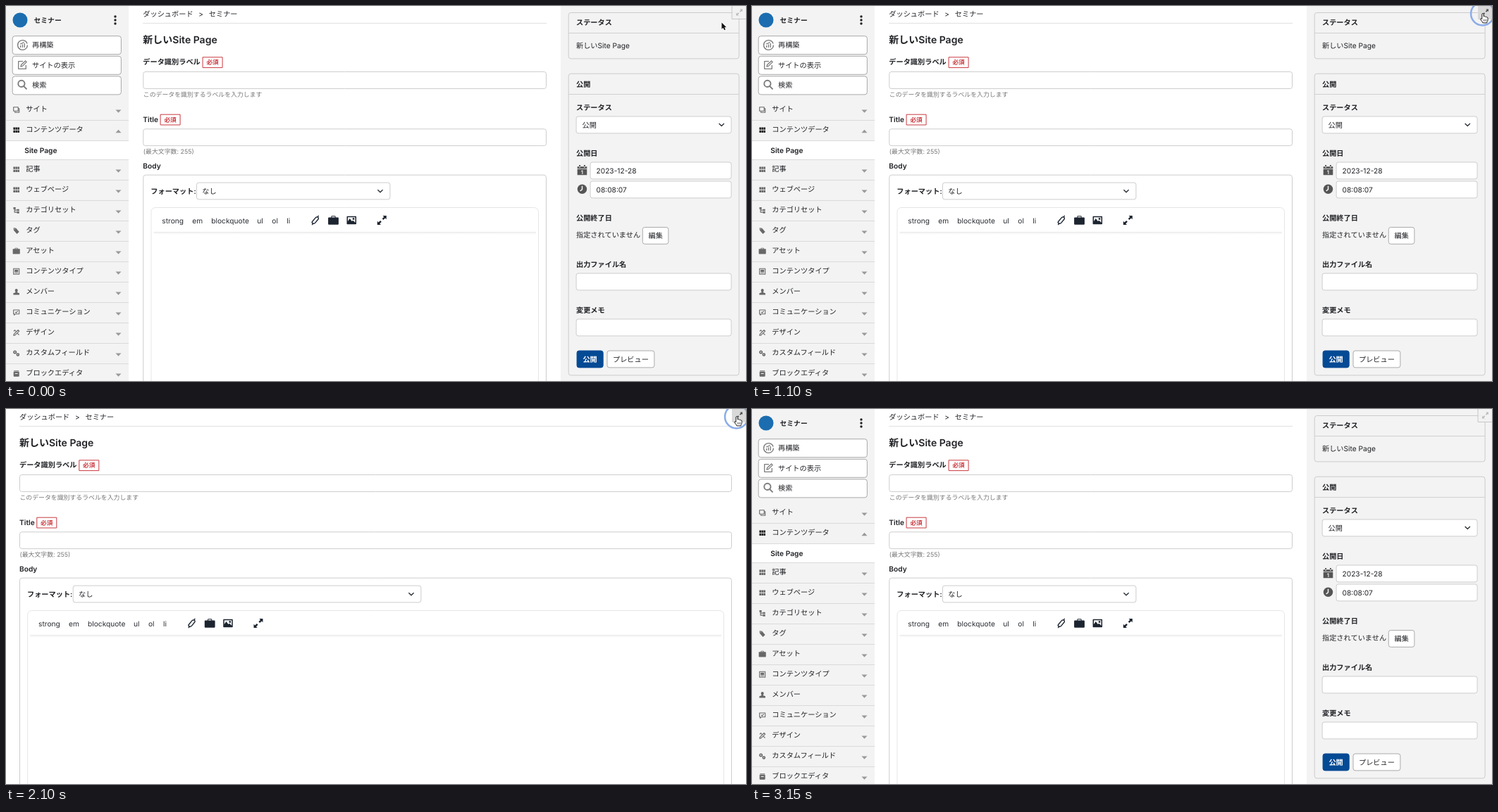
Write an HTML page with a canvas that moves like this. It is 1050 px wide and 533 px high and loops after 4550 ms.

```html
<!DOCTYPE html>
<html lang="ja">
<head>
<meta charset="utf-8">
<style>
html, body { margin: 0; width: 100%; height: 100%; overflow: hidden; background: #fff; }
canvas { display: block; width: 1050px; height: 533px; }
</style>
</head>
<body>
<canvas id="stage"></canvas>
<script>
const W = 1050, H = 533, LOOP = 4550, STEP = 50;
const FONT = 'Inter, "Noto Sans CJK JP", "Noto Sans CJK", sans-serif';
const INK = '#212226', PANEL = '#f3f3f3', GREY = '#686868', LINE = '#cdcdcd', RED = '#c93a40', NAVY = '#1c2430';
const canvas = document.getElementById('stage');
const ratio = window.devicePixelRatio || 1;
canvas.width = W * ratio;
canvas.height = H * ratio;
const ctx = canvas.getContext('2d');
ctx.textRendering = 'geometricPrecision';

// y is the visual middle of the line
function text(str, x, y, { size = 10.2, weight = 400, color = INK } = {}) {
  ctx.font = `${weight} ${size}px ${FONT}`;
  ctx.fillStyle = color;
  ctx.fillText(str, x, y + size * 0.365);
}
const bold = (str, x, y, opt) => text(str, x, y, { weight: 600, ...opt });

function rect(x, y, w, h, color) {
  ctx.fillStyle = color;
  ctx.fillRect(x, y, w, h);
}

function box(x1, y1, x2, y2, { r = 3, fill = '#fff', line = LINE } = {}) {
  ctx.beginPath();
  ctx.roundRect(x1 + 0.5, y1 + 0.5, x2 - x1 - 1, y2 - y1 - 1, r);
  if (fill) { ctx.fillStyle = fill; ctx.fill(); }
  if (line) { ctx.strokeStyle = line; ctx.lineWidth = 1; ctx.stroke(); }
}

function disc(x, y, r, color) {
  ctx.beginPath();
  ctx.arc(x, y, r, 0, 7);
  ctx.fillStyle = color;
  ctx.fill();
}

function shape(x, y, d, { fill, line, width = 1, scale = 1 }) {
  const path = new Path2D(d);
  ctx.save();
  ctx.translate(x, y);
  ctx.scale(scale, scale);
  ctx.lineJoin = 'round';
  if (fill) { ctx.fillStyle = fill; ctx.fill(path, 'evenodd'); }
  if (line) { ctx.strokeStyle = line; ctx.lineWidth = width; ctx.stroke(path); }
  ctx.restore();
}

const chevron = (x, y) => shape(x, y, 'M-3.6-1.8L0 1.8L3.6-1.8', { line: '#2c3138', width: 1.4 });
const caret = (x, y, up) => shape(x, y, up ? 'M-4 2.2H4L0-2.2Z' : 'M-4-2.2H4L0 2.2Z', { fill: '#999' });
const expand = (x, y, scale, fill) => shape(x, y,
  'M6-6V-1.2L4.4-2.8L2 -.4L.4-2L2.8-4.4L1.2-6ZM-6 6V1.2L-4.4 2.8L-2 .4L-.4 2L-2.8 4.4L-1.2 6Z', { fill, scale });

const CASE = 'M-4.4-3H-2.2V-3.7Q-2.2-4.5-1.4-4.5H1.4Q2.2-4.5 2.2-3.7V-3H4.4Q5.1-3 5.1-2.3V3.4Q5.1 4.1 4.4 4.1H-4.4Q-5.1 4.1-5.1 3.4V-2.3Q-5.1-3-4.4-3ZM-1.5-3H1.5V-3.8H-1.5Z';
const GRID = 'M-4.3-3.8H-1.7V-.5H-4.3ZM-1.3-3.8H1.3V-.5H-1.3ZM1.7-3.8H4.3V-.5H1.7ZM-4.3 .4H-1.7V3.7H-4.3ZM-1.3 .4H1.3V3.7H-1.3ZM1.7 .4H4.3V3.7H1.7Z';
const ICONS = {
  copy: { line: 'M-4-3.5H2.5V2H-4ZM3-1.5H4V4H-2V2.6' },
  grid: { fill: GRID },
  tree: { line: 'M-2.6-2.5V2.8H1M-2.6-.2H1', fill: 'M-4.2-4.2H-1V-1.6H-4.2ZM.8-1.6H4V1H.8ZM.8 1.8H4V4.4H.8Z' },
  tag: { fill: 'M-4-4L-.5-3.6L4 1.6L.8 4.6L-3.8-.6ZM-2.9-2.9H-1.9V-1.9H-2.9Z' },
  bag: { fill: CASE },
  type: { line: 'M-4-4H4V4H-4Z', fill: 'M-2.5-2.5H2.5V.6H-2.5ZM-2.5 1.5H2.5V2.4H-2.5Z' },
  user: { fill: 'M-2-2.2A2 2.2 0 0 1 2-2.2Q2-.5 1 .6L4.3 2V4.2H-4.3V2L-1 .6Q-2-.5-2-2.2Z' },
  talk: { line: 'M-4-3.3H4V2.4H-1.5L-3 4V2.4H-4ZM-1.6-.5L-.3 .8L2-1.6' },
  tools: { line: 'M-3.9 4L-3.4 2L2.4-3.8L4-2.2L-1.9 3.6ZM-3.8-2L-2.2-3.6L-.6-2M1.6 1L3.8 3.2' },
  gears: { line: 'M-3.7-1.4A1.7 1.7 0 1 1-.3-1.4A1.7 1.7 0 1 1-3.7-1.4M.6 2.2A1.5 1.5 0 1 1 3.6 2.2A1.5 1.5 0 1 1 .6 2.2', w: 1.6 },
  jar: { fill: 'M-3.5-4H3.5V-2.8H-3.5ZM-4-2.2H4V3.4Q4 4.4 3 4.4H-3Q-4 4.4-4 3.4ZM-2-.4H2V.7H-2Z' }
};

const MENU = [
  ['サイト', 'copy'], ['コンテンツデータ', 'grid'], null,
  ['記事', 'grid'], ['ウェブページ', 'grid'], ['カテゴリセット', 'tree'], ['タグ', 'tag'],
  ['アセット', 'bag'], ['コンテンツタイプ', 'type'], ['メンバー', 'user'], ['コミュニケーション', 'talk'],
  ['デザイン', 'tools'], ['カスタムフィールド', 'gears'], ['ブロックエディタ', 'jar']
];

function sidebar() {
  rect(0, 0, 174, H, PANEL);
  disc(20, 20, 10.5, '#1b6db0');
  bold('セミナー', 39.5, 20.2, { size: 9.8 });
  for (const y of [15, 20, 25]) disc(155, y, 1.7, '#222');

  ['再構築', 'サイトの表示', '検索'].forEach((label, i) => {
    const y = 42.2 + i * 28.6;
    box(8.7, y, 163.9, y + 27, { r: 3.5, line: '#a8a8a8' });
    text(label, 37, y + 13);
  });
  const tool = { line: '#7c7c7c', width: 1.3 };
  shape(23.5, 55.5, 'M6.9 0A6.9 6.9 0 1 1 6.6-2M-2.8 3.4V.6M0 3.4V-1M2.8 3.4V-2.6M-3.2-1.4L2.4-4', tool);
  shape(23, 84, 'M1-5.3H-5.3V5.3H5.3V0M-2 2L-1.4-.4L4.6-6L6.2-4.4L.4 1.4Z', tool);
  shape(22.5, 112, 'M4-1.6A4.6 4.6 0 1 1-5.2-1.6A4.6 4.6 0 1 1 4-1.6M2.6 1.8L7 6.4', { ...tool, width: 1.9 });

  rect(0, 191, 174, 28, '#fff');
  for (let i = 0; i < MENU.length; i++) {
    const y = i < 3 ? 147 + i * 29 : 232 + (i - 3) * 29;
    if (i) rect(0, i < 3 ? 133 + i * 29 : 218 + (i - 3) * 29, 174, 1, '#dadada');
    if (!MENU[i]) {
      bold('Site Page', 26.3, y);
      continue;
    }
    const [label, name] = MENU[i], icon = ICONS[name], open = i === 1;
    const color = open ? '#222' : GREY;
    if (icon.line) shape(14.7, y + 0.3, icon.line, { line: color, width: icon.w || 1.1 });
    if (icon.fill) shape(14.7, y + 0.3, icon.fill, { fill: color });
    text(label, 28.3, y - 0.4);
    caret(159.5, y + (open ? 2 : 2.6), open);
  }
}

function required(x, y) {
  box(x, y, x + 29, y + 15.8, { r: 0, line: RED });
  bold('必須', x + 5.8, y + 8, { size: 8.7, color: RED });
}

function form(left, right, selectRight) {
  const hint = { size: 8.9, color: '#777' };
  text('ダッシュボード', left, 11.3);
  text('>', left + 79, 11.6);
  text('セミナー', left + 93.5, 11.3);
  rect(left, 24, right - left, 1, '#e0e0e0');
  bold('新しいSite Page', left, 48, { size: 14 });

  bold('データ識別ラベル', left, 79);
  required(left + 84.3, 72.3);
  box(left, 93, right, 118);
  text('このデータを識別するラベルを入力します', left + 0.5, 125.5, hint);

  bold('Title', left, 161);
  required(left + 24.3, 153.7);
  box(left, 174.3, right, 199.1);
  text('(最大文字数: 255)', left + 0.5, 207, hint);

  bold('Body', left, 227);
  box(left, 239.7, right, H + 20, { r: 3.5 });
  bold('フォーマット:', left + 11, 263);
  box(left + 75.7, 250.6, selectRight + 0.4, 275.4);
  text('なし', left + 84, 263);
  chevron(selectRight - 14, 263);

  const inner = left + 11.2, end = right - 11;
  box(inner, 286, end, H + 20, { r: 6, line: '#e6e6e6' });
  const words = { strong: 27, em: 70, blockquote: 97, ul: 162, ol: 183, li: 204 };
  for (const word in words) text(word, left + words[word], 305, { color: '#2a2d33' });
  shape(left + 244.5, 304.5,
    'M-2 4.8H-2.8Q-5 4.4-4.4 2.2L.2-3.4Q1.2-4.6 2.8-4.6Q5.2-4.2 4.4-1.8L0 3.6Q-.9 4.7-2 4.8M-3.2 4.8L-4.6 6.6M3.4-4.6L4.8-6.6',
    { line: NAVY, width: 1.4 });
  shape(left + 270.2, 304.8, CASE, { fill: NAVY, scale: 1.45 });
  shape(left + 296, 304.5, 'M-6-5H6V5H-6Z', { line: NAVY, width: 1.5 });
  shape(left + 296, 304.5, 'M-6 5V2.5L-2.5-2.5L.5 1.5L2 .2L6 4V5ZM1.5-3.2H4V-.8H1.5Z', { fill: NAVY });
  expand(left + 339, 304.5, 1.08, NAVY);

  const shade = ctx.createLinearGradient(0, 321, 0, 325);
  shade.addColorStop(0, '#e6e6e6');
  shade.addColorStop(0.4, '#f5f5f5');
  shade.addColorStop(1, '#ffffff');
  ctx.fillStyle = shade;
  ctx.fillRect(inner + 4, 321, end - inner - 8, 4);
}

function side() {
  rect(787, 0, 263, H, PANEL);
  const card = { r: 3.5, fill: PANEL, line: '#cbcbcb' };
  box(797.7, 9, 1040.6, 75.4, card);
  rect(798, 38, 242, 1, '#d0d0d0');
  bold('ステータス', 809, 23.5);
  text('新しいSite Page', 809, 56.6);

  box(797.7, 95.7, 1040.6, 525.4, card);
  rect(798, 125, 242, 1, '#d0d0d0');
  const labels = [['公開', 111], ['ステータス', 144], ['公開日', 209], ['公開終了日', 301], ['出力ファイル名', 367], ['変更メモ', 432]];
  for (const [label, y] of labels) bold(label, 809, y);
  for (const [x, y] of [[809, 157], [829, 222], [829, 249], [809, 380], [809, 445]]) {
    box(x - 0.4, y - 0.5, 1029.6, y + 24.4);
  }
  text('公開', 817.5, 168.8);
  chevron(1015.3, 168.8);
  text('2023-12-28', 837.5, 234.2);
  text('08:08:07', 837.5, 261.2);

  shape(817.5, 233.5, 'M-6.8-5.2H6.8V-2.2H-6.8ZM-6.8-1.4H6.8V6.8H-6.8ZM-4.4-7.4H-2.4V-4H-4.4ZM2.4-7.4H4.4V-4H2.4Z', { fill: '#555' });
  bold('1', 815.8, 236.3, { size: 7.5, color: '#fff' });
  disc(817.5, 260.3, 6.7, '#555');
  shape(817.5, 260.3, 'M0-4.6V.4L-2.8 2.6', { line: '#fff', width: 1.4 });

  text('指定されていません', 809, 325.7);
  const button = { r: 3, line: '#aaa' };
  box(902.8, 314, 940.4, 338.8, button);
  text('編集', 911.5, 326.3);
  box(809.6, 489.5, 847.7, 514.4, { r: 3, fill: '#044a94', line: '#044a94' });
  bold('公開', 818.4, 502, { color: '#fff' });
  box(852.5, 489.5, 920.4, 514.4, button);
  text('プレビュー', 861, 502);
}

function toggle(hover, wide) {
  ctx.globalAlpha = hover ? 1 : 0.85;
  rect(1030, 0, 20, 19, hover ? '#d9d9d9' : wide ? '#fff' : PANEL);
  ctx.globalAlpha = 1;
  if (!hover) shape(0, 0, 'M1030 0V18.5H1050', { line: '#c6c6c6' });
  expand(1040.5, 9, 0.75, hover ? '#505050' : '#bcbcbc');
}

const ARROW = 'M0 0V10.4L2.4 8.2L4.1 12L6 11.2L4.3 7.5H7.5Z';
const HAND = 'M-1.2 .8Q0-.9 1.2 .8V4.4Q2.6 3.6 3.3 4.8Q4.7 4.2 5.2 5.4Q7 5 7.1 6.8V9.2Q7 11 5.9 12.2V13.4H-.2V12.5Q-2 10.8-3.6 8.2Q-3.5 6.5-1.2 8Z';

function cursor(x, y, hand) {
  if (hand) {
    shape(x, y, HAND, { fill: '#fff', line: '#222', width: 1 });
    shape(x, y, 'M1.4 8.5V11.2M3.2 8.5V11.2M5 8.5V11.2', { line: '#333', width: 0.7 });
  } else {
    shape(x, y, ARROW, { fill: '#111', line: '#fff', width: 1.6, scale: 0.9 });
    shape(x, y, ARROW, { fill: '#111', scale: 0.9 });
  }
}

function ripple(age, life) {
  if (age < 0 || age >= life) return;
  const grow = Math.min(1, (age + 50) / 180);
  ctx.globalAlpha = Math.min(1, (life - age) / 200);
  ctx.beginPath();
  ctx.arc(1036.5, 11, 16.5 * (1 - (1 - grow) ** 3), 0, 7);
  ctx.strokeStyle = '#8bacea';
  ctx.lineWidth = 2.5;
  ctx.stroke();
  ctx.globalAlpha = 1;
}

const span = (t, a, b) => Math.min(1, Math.max(0, (t - a) / (b - a)));
const glide = p => 0.5 * p + 0.5 * p * p * (3 - 2 * p);

function draw(t) {
  const wide = t >= 1150 && t < 2150;
  const go = glide(span(t, 400, 850)), leave = span(t, 2800, 3150) ** 1.5;
  const x = 1015.5 + 21.5 * go + 8 * leave;
  const y = 23.5 - 13 * go - 26 * leave;
  const over = x > 1030 && y > 0 && y < 19;

  ctx.setTransform(ratio, 0, 0, ratio, 0, 0);
  rect(0, 0, W, H, '#fff');
  if (wide) {
    form(19, 1030, 589);
  } else {
    form(194.3, 767, 545);
    sidebar();
    side();
  }
  toggle(over, wide);
  ripple(t - 1000, 350);
  ripple(t - 2000, 500);
  if (t < 3150) cursor(x, y, over);
}

function tick() {
  const t = performance.now() % LOOP;
  draw(Math.floor(t / STEP) * STEP);
  requestAnimationFrame(tick);
}
tick();
</script>
</body>
</html>
```
